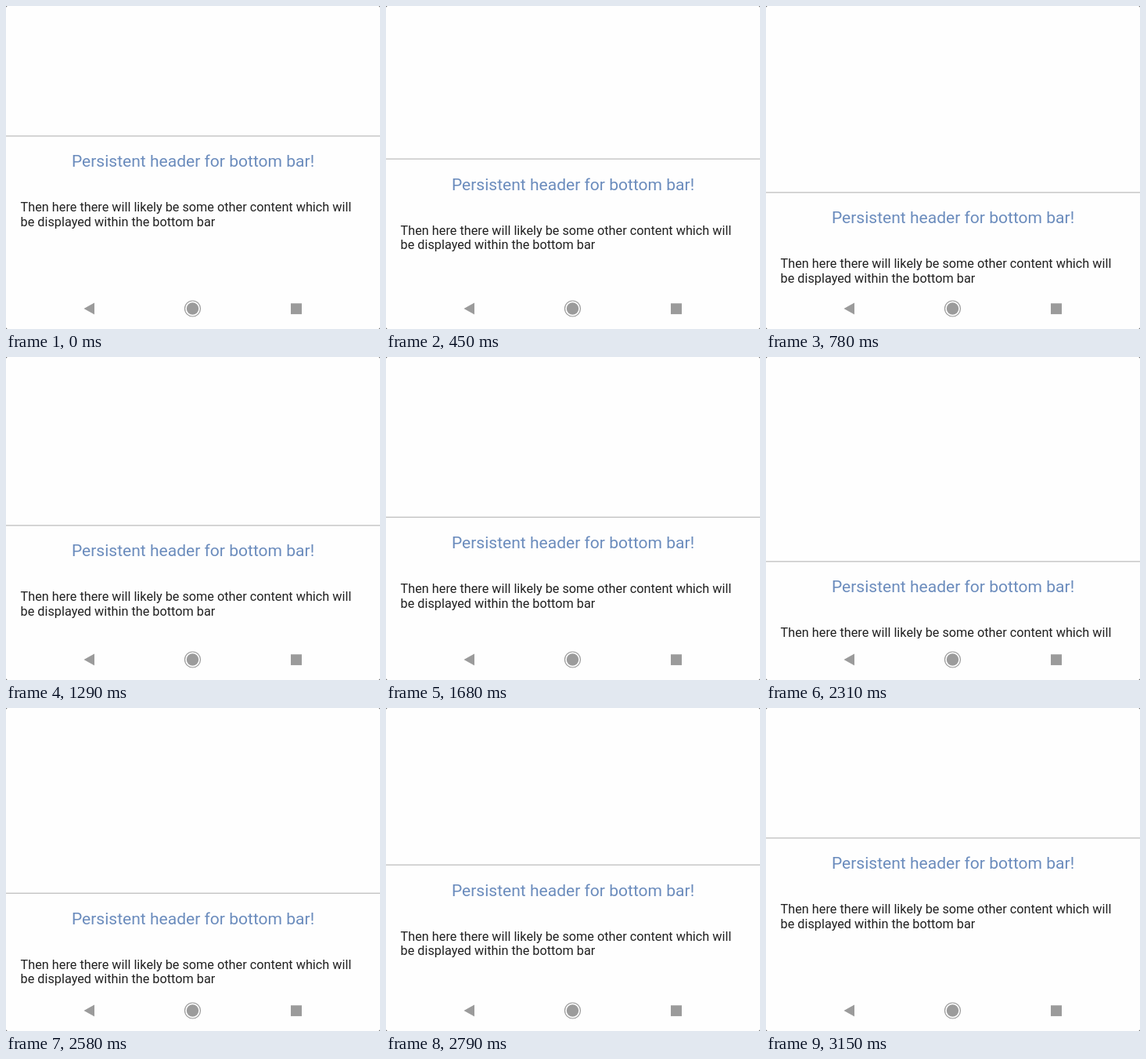
Write an HTML page that moves like this. It is 478 px wide and 412 px high and loops after 4140 ms.

```html
<!DOCTYPE html>
<html lang="en">
<head>
<meta charset="utf-8">
<title>Bottom bar</title>
<style>
  html, body { margin: 0; width: 100%; height: 100%; overflow: hidden; background: #222; }
  svg { display: block; width: 478px; height: 412px; }
  text { font-family: Roboto, "Liberation Sans", sans-serif; }
  .header { font-size: 21.05px; fill: #6b8cbd; text-anchor: middle; }
  .body { font-size: 16.25px; fill: #212121; }
</style>
</head>
<body>
<svg viewBox="0 0 478 412">
  <defs>
    <clipPath id="content"><rect width="478" height="359"/></clipPath>
  </defs>
  <rect width="478" height="412" rx="2" fill="#fefefe"/>
  <g clip-path="url(#content)">
    <g id="sheet">
      <rect y="165.2" width="478" height="1.3" fill="#c0c0c0"/>
      <text class="header" x="239" y="205.3">Persistent header for bottom bar!</text>
      <text class="body" x="18.6" y="262.4">Then here there will likely be some other content which will</text>
      <text class="body" x="18.6" y="281">be displayed within the bottom bar</text>
    </g>
  </g>
  <g fill="#9b9b9b">
    <path d="M99.5 386L113 378.5V393.5Z"/>
    <circle cx="238.5" cy="386" r="7.7"/>
    <circle cx="238.5" cy="386" r="10" fill="none" stroke="#9b9b9b" stroke-width="1.2"/>
    <rect x="364" y="379.3" width="14" height="13.8"/>
  </g>
</svg>
<script>
const LOOP = 4140;
const STEP = 30;
const sheet = document.getElementById('sheet');

// Drag path of the sheet: [time in ms, offset in px, speed in px/ms]
const path = [
  [0, 0, 0.05], [540, 37, 0.09], [780, 72, 0.17], [930, 92, 0],
  [1110, 72, -0.13], [1290, 49, -0.15], [1470, 22, 0], [1650, 33, 0.16],
  [1680, 38.5, 0.16], [2310, 95, 0], [2400, 94.5, -0.06],
  [2730, 43.5, -0.16], [2790, 34.3, -0.15], [3150, 0, 0], [LOOP, 0, 0]
];
// Moments where the finger rests
const rests = [[540, 600], [780, 840], [2310, 2400]];

function offsetAt(time) {
  let t = Math.floor(time / STEP + 1e-6) * STEP;
  for (const [from, to] of rests) if (t >= from && t < to) t = from;
  const i = path.findIndex((p, k) => k > 0 && t <= p[0]);
  const [t0, y0, v0] = path[i - 1];
  const [t1, y1, v1] = path[i];
  const d = t1 - t0, u = (t - t0) / d, w = 1 - u;
  return y0 * w * w * (1 + 2 * u) + y1 * u * u * (1 + 2 * w)
    + d * u * w * (v0 * w - v1 * u);
}

function render(time) {
  sheet.setAttribute('transform', `translate(0 ${offsetAt(time % LOOP).toFixed(2)})`);
}

const start = performance.now();
function tick() {
  render(performance.now() - start);
  requestAnimationFrame(tick);
}
tick();
</script>
</body>
</html>
```
